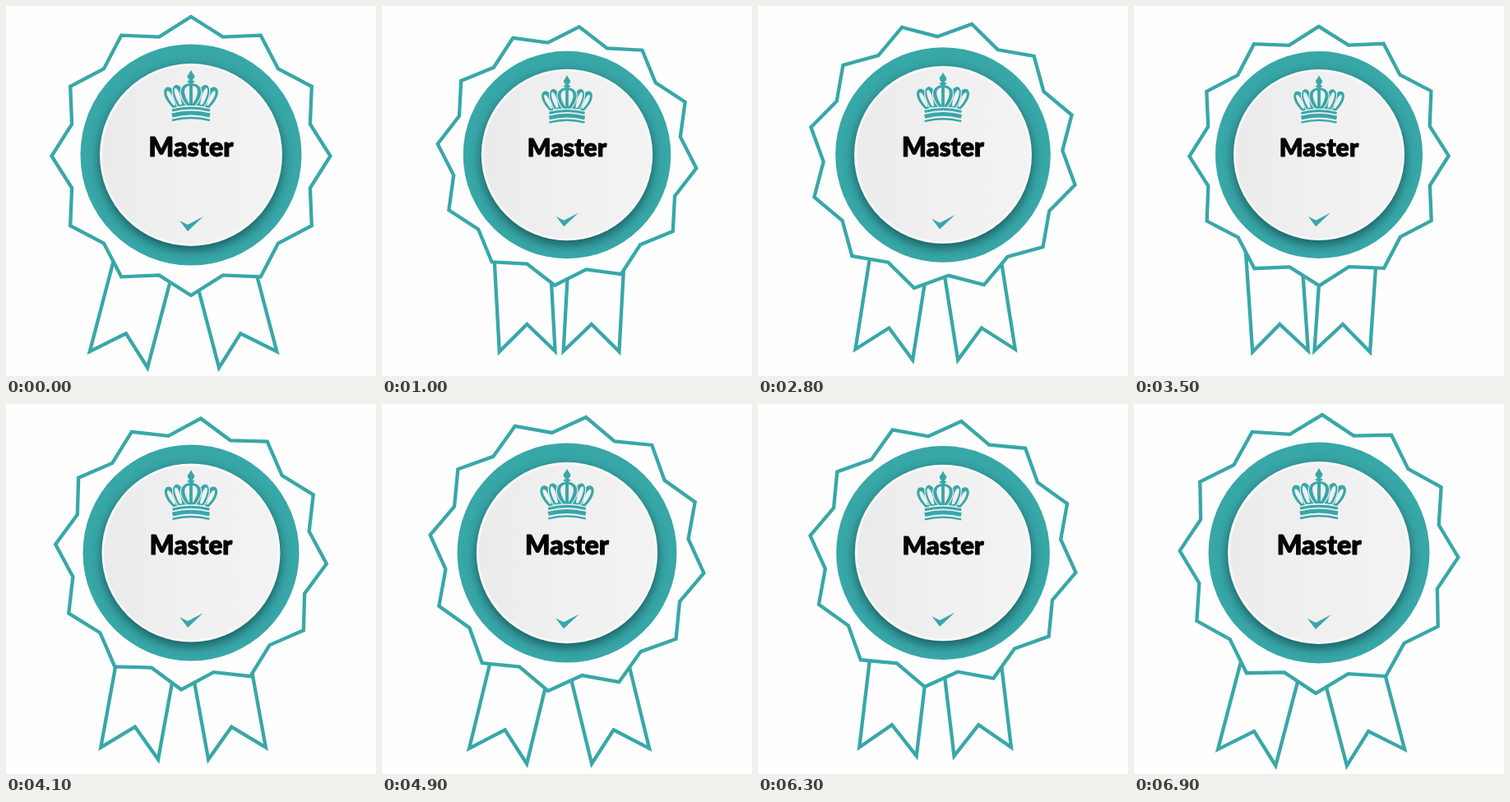
Recreate the animation shown at these times as an HTML page with a canvas. Size 450 px wide and 450 px high, loop 7000 ms.

```html
<!DOCTYPE html>
<html lang="en">
<head>
<meta charset="utf-8">
<title>Master rosette</title>
<style>
html, body { margin: 0; width: 100%; height: 100%; overflow: hidden; background: #fefefe; }
canvas { display: block; width: 450px; height: 450px; }
</style>
</head>
<body>
<canvas id="stage" width="450" height="450"></canvas>
<script>
const ctx = document.getElementById('stage').getContext('2d');
const TEAL = '#38a7a8';
const PAPER = '#fefefe';
const FACE = '#f0f0f1';
const LINE = 4.3;
const LOOP = 7000, STEP = 100, PULSE = LOOP / 3;
const HALF = PULSE / 2, GROW_AT = 1150;
const CX = 225, RIBBON_AXIS = 215.6;
const rad = deg => deg * Math.PI / 180;
const mix = (a, b, k) => a + (b - a) * k;

// Cubic timing curve (x1, 0, x2, 1), solved by bisection.
function ease(x, x1 = 0.33, x2 = 0.51) {
  let low = 0, high = 1, s = 0.5;
  for (let i = 0; i < 24; i++) {
    s = (low + high) / 2;
    const at = 3 * (1 - s) ** 2 * s * x1 + 3 * (1 - s) * s * s * x2 + s ** 3;
    if (at < x) low = s; else high = s;
  }
  return s * s * (3 - 2 * s);
}

function stroke(width, color = TEAL) {
  ctx.lineWidth = width;
  ctx.strokeStyle = color;
  ctx.stroke();
}

function fill(color) {
  ctx.fillStyle = color;
  ctx.fill();
}

function disc(x, y, r, color) {
  ctx.beginPath();
  ctx.arc(x, y, r, 0, 2 * Math.PI);
  fill(color);
}

// One tail with a notched end; squeeze 0 is spread out, 1 is drawn in.
function ribbon(squeeze) {
  const u = squeeze ** 1.1;
  const x = mix(137, 178, u);
  const y = 430 - 10 * (u + 0.85 * u * (1 - u));
  const half = mix(36.5, 33.8, u);
  const tilt = 15.7 - 17 * u ** 1.3;
  const lean = rad(tilt - 1 - 1.6 * u);
  const dx = Math.cos(rad(tilt)), dy = Math.sin(rad(tilt));
  const upX = 148 * Math.sin(lean), upY = -148 * Math.cos(lean);
  const left = [x - half * dx, y - half * dy];
  const right = [x + half * dx, y + half * dy];
  ctx.beginPath();
  ctx.moveTo(left[0] + upX, left[1] + upY);
  ctx.lineTo(...left);
  ctx.lineTo(x + 33 * dy, y - 33 * dx);
  ctx.lineTo(...right);
  ctx.lineTo(right[0] + upX, right[1] + upY);
  stroke(LINE);
}

function star(angle, scale) {
  ctx.beginPath();
  for (let i = 0; i < 24; i++) {
    const r = (i % 2 ? 150 : 169.5) * scale;
    const a = rad(i * 15 + angle);
    ctx.lineTo(CX + r * Math.sin(a), 182.5 - r * Math.cos(a));
  }
  ctx.closePath();
  fill(PAPER);
  stroke(LINE);
}

function petal(color, x, y, ...curve) {
  ctx.beginPath();
  ctx.moveTo(x, y);
  ctx.bezierCurveTo(...curve);
  ctx.closePath();
  if (color === TEAL) stroke(2.4, FACE);
  fill(color);
}

function crownBand(y, width) {
  ctx.beginPath();
  ctx.moveTo(-23, y);
  ctx.quadraticCurveTo(0, y - 6, 23, y);
  stroke(width);
}

// Drawn around its own middle axis, y measured from the medal centre.
function crown() {
  for (const side of [-1, 1]) {
    ctx.save();
    ctx.scale(side, 1);
    petal(TEAL, 14, -59, 20, -98, 48, -82, 22, -57);
    petal(FACE, 19, -60, 26, -88, 38, -79, 21, -60);
    petal(TEAL, 6, -60, 8, -97, 34, -90, 16, -59);
    petal(FACE, 11, -61, 15, -91, 28, -85, 14, -61);
    ctx.restore();
  }
  ctx.beginPath();
  ctx.moveTo(-5, -60);
  ctx.bezierCurveTo(-18, -76, -12, -87, 0, -87);
  ctx.bezierCurveTo(12, -87, 18, -76, 5, -60);
  ctx.closePath();
  stroke(2.4, FACE);
  fill(TEAL);
  petal(FACE, -2, -62, -10, -74, -10, -83, -2, -84);
  petal(FACE, 2, -62, 10, -74, 10, -83, 2, -84);

  ctx.beginPath();
  ctx.moveTo(0, -103);
  ctx.quadraticCurveTo(2, -99, 4.5, -96);
  ctx.quadraticCurveTo(4, -92, 1.5, -91);
  ctx.lineTo(5, -89);
  ctx.lineTo(0, -86);
  ctx.lineTo(-5, -89);
  ctx.lineTo(-1.5, -91);
  ctx.quadraticCurveTo(-4, -92, -4.5, -96);
  ctx.quadraticCurveTo(-2, -99, 0, -103);
  fill(TEAL);
  crownBand(-54, 3.2);
  crownBand(-48, 5);
  crownBand(-42, 2.4);
}

function tick() {
  ctx.beginPath();
  ctx.moveTo(-14, 80);
  ctx.lineTo(-4, 93);
  ctx.lineTo(15, 75);
  ctx.lineTo(-4, 85);
  ctx.closePath();
  fill(TEAL);
}

function medal(scale) {
  ctx.save();
  ctx.translate(CX, 181);
  ctx.scale(scale, scale);
  disc(0, 0, 134.5, TEAL);

  ctx.save();
  ctx.shadowColor = 'rgba(0, 35, 40, 0.6)';
  ctx.shadowBlur = 14;
  ctx.shadowOffsetY = 5;
  disc(0, 0, 111, '#f7f8f8');
  ctx.restore();
  const sheen = ctx.createLinearGradient(-108, 0, 108, 0);
  sheen.addColorStop(0, '#ebebec');
  sheen.addColorStop(0.5, FACE);
  sheen.addColorStop(1, '#f3f3f4');
  disc(0, 0, 108, sheen);

  crown();
  tick();
  ctx.fillStyle = '#050505';
  ctx.font = '900 32px Lato, "Open Sans", sans-serif';
  ctx.textAlign = 'center';
  ctx.textBaseline = 'alphabetic';
  ctx.lineJoin = 'round';
  ctx.fillText('Master', 0, 2);
  ctx.lineWidth = 0.9;
  ctx.strokeStyle = '#050505';
  ctx.strokeText('Master', 0, 2);
  ctx.restore();
}

function draw(time) {
  const local = time % PULSE;
  const growing = local >= GROW_AT;
  const progress = ease(Math.min(1, (growing ? local - GROW_AT : local) / HALF));
  const squeeze = growing ? 1 - progress : progress;
  const turn = -180 * (growing ? 1 + progress : progress);

  ctx.fillStyle = PAPER;
  ctx.fillRect(0, 0, 450, 450);
  ribbon(squeeze);
  ctx.save();
  ctx.translate(2 * RIBBON_AXIS, 0);
  ctx.scale(-1, 1);
  ribbon(squeeze);
  ctx.restore();
  star(turn, 1 - 0.07 * squeeze);
  medal(1 - 0.063 * squeeze);
}

const start = performance.now();
function frame() {
  const time = (performance.now() - start) % LOOP;
  draw(Math.floor(time / STEP) * STEP);
  requestAnimationFrame(frame);
}
frame();
</script>
</body>
</html>
```
